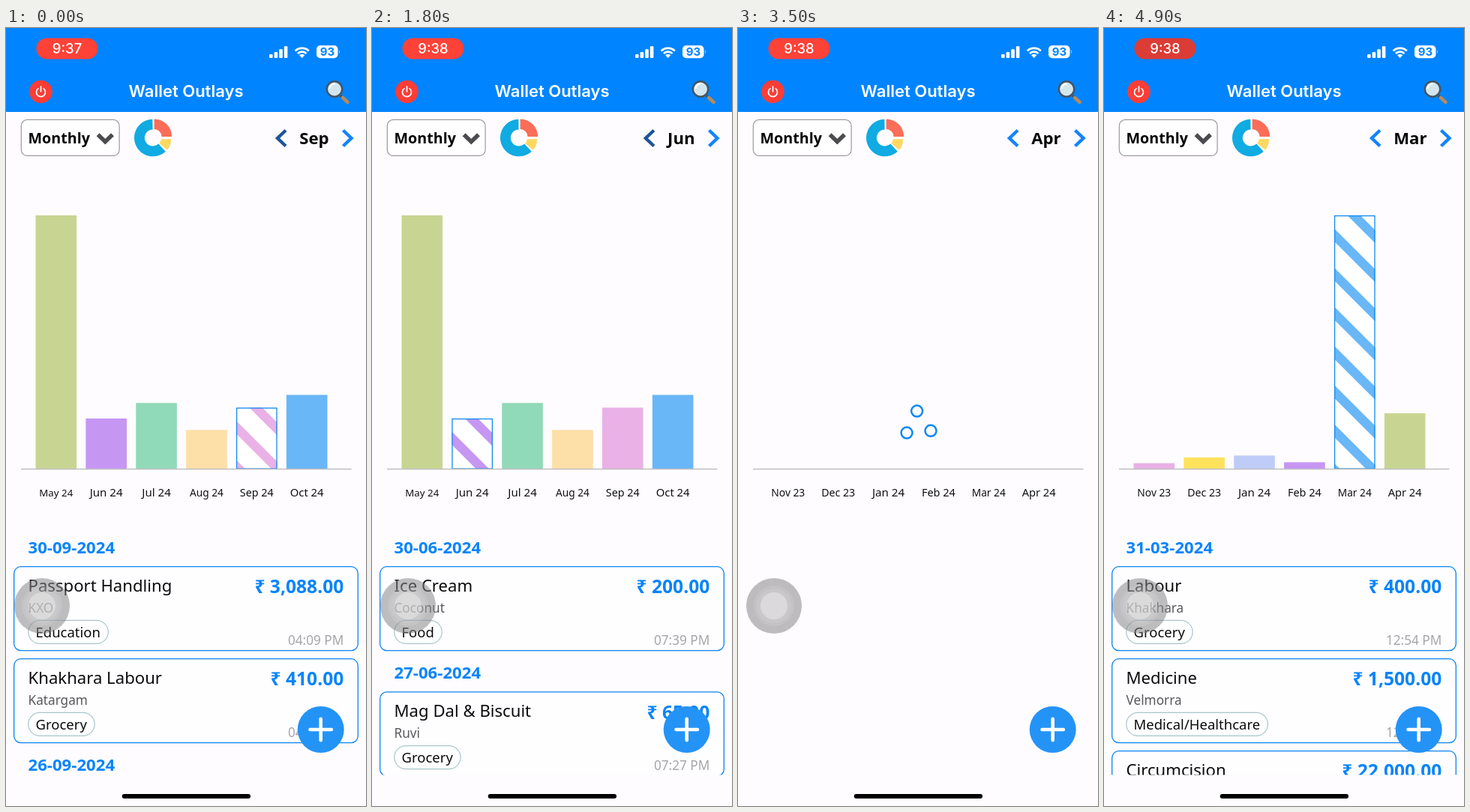
Recreate the animation shown at these times as an HTML page. Size 480x1038 px, loop 5000 ms.

```html
<!DOCTYPE html>
<html lang="en">
<head>
<meta charset="utf-8">
<title>Expense chart</title>
<style>
  html, body { margin: 0; width: 100%; height: 100%; overflow: hidden; background: #fefcff; }
  svg { display: block; }
  #stage { width: 100vw; height: 100vh; }
  text { font-family: "Noto Sans", "Open Sans", sans-serif; }
  .ui { font-family: Inter, Roboto, sans-serif; }
</style>
</head>
<body>
<svg id="stage" viewBox="0 0 480 1038">
  <rect width="480" height="1038" fill="#fefcff"/>
  <rect width="480" height="112" fill="#0084ff"/>

  <!-- status bar -->
  <rect id="pill" x="40.5" y="13.5" width="82" height="28" rx="14"/>
  <text id="clock" class="ui" x="81.5" y="34.3" font-size="18.5" font-weight="500" fill="#fff" text-anchor="middle"></text>
  <g fill="#fff">
    <rect x="351" y="35" width="4.6" height="5" rx="1.2"/>
    <rect x="357.6" y="32" width="4.6" height="8" rx="1.2"/>
    <rect x="364.2" y="28.3" width="4.6" height="11.7" rx="1.2"/>
    <rect x="370.8" y="24.2" width="4.6" height="15.8" rx="1.2"/>
    <path d="M391 36.2a5.2 5.2 0 0 1 7.4 0l-3.7 3.8z"/>
    <rect x="414" y="23.3" width="28.5" height="17" rx="5"/>
    <path d="M444 29.3q2.4 2.5 0 5z" opacity=".6"/>
  </g>
  <g fill="none" stroke="#fff" stroke-width="2.7">
    <path d="M385.6 30.6a12.9 12.9 0 0 1 18.2 0"/>
    <path d="M388.9 34.1a8.2 8.2 0 0 1 11.6 0"/>
  </g>
  <text class="ui" x="428.5" y="37.2" font-size="15" font-weight="700" fill="#0084ff" text-anchor="middle">93</text>

  <!-- title bar -->
  <circle cx="46.5" cy="85" r="15.3" fill="#fc3d36"/>
  <path d="M43 80.8a6 6 0 1 0 7 0M46.5 78v6.8" fill="none" stroke="#fff" stroke-width="1.7" stroke-linecap="round"/>
  <text class="ui" x="240" y="92.3" font-size="22" font-weight="600" fill="#fff" text-anchor="middle">Wallet Outlays</text>
  <path d="M446 90l3.5 3.5" stroke="#4a535a" stroke-width="3.5"/>
  <path d="M449 93l6.5 6" stroke="#b98a58" stroke-width="4.6" stroke-linecap="round"/>
  <circle cx="438" cy="81.5" r="10.2" fill="#d3e6ee" stroke="#46545f" stroke-width="2.4"/>
  <path d="M431.5 80a7 7 0 0 1 6-5.5" fill="none" stroke="#fff" stroke-width="2.4" stroke-linecap="round"/>

  <!-- toolbar -->
  <rect x="20.3" y="122.4" width="130.8" height="48" rx="8" fill="#fff" stroke="#9b9a9d" stroke-width="1.2"/>
  <text x="29.5" y="154" font-size="19.7" font-weight="700" fill="#050505">Monthly</text>
  <path d="M122.6 142.3l9.7 9.4 9.7-9.4" fill="none" stroke="#4c4c50" stroke-width="5.6"/>
  <g id="donut"></g>
  <path d="M449.5 136.5l11 10.5-11 10.5" fill="none" stroke="#1284fa" stroke-width="4.4"/>
  <g id="month"></g>

  <g id="chart"></g>
  <svg width="480" height="996.5"><g id="list"></g></svg>
  <g id="loader" fill="none" stroke="#0d87f8" stroke-width="2.5"></g>

  <!-- floating controls -->
  <circle cx="48" cy="771" r="37" fill="#888588" opacity=".54"/>
  <circle cx="48" cy="771" r="27" fill="#fff" opacity=".1"/>
  <circle cx="48" cy="771" r="23" fill="#fff" opacity=".08"/>
  <circle cx="48" cy="771" r="18" fill="#fff" opacity=".32"/>
  <circle cx="419.7" cy="936" r="31" fill="#2493f6"/>
  <path d="M405.5 936h28.4M419.7 921.8v28.4" stroke="#fff" stroke-width="4.6" stroke-linecap="round"/>
  <rect x="154.7" y="1022" width="171.3" height="6" rx="3" fill="#000"/>
</svg>

<script>
const LOOP = 5000, STEP = 100, BLUE = '#0684fb', FLOOR = 588;
const $ = id => document.getElementById(id);
const pen = document.createElement('canvas').getContext('2d');

const textWidth = (s, size, weight = 400) => {
  pen.font = `${weight} 100px "Noto Sans", "Open Sans", sans-serif`;
  return pen.measureText(s).width * size / 100;
};
const label = (s, x, y, size, fill, extra = '') =>
  `<text x="${x}" y="${y}" font-size="${size}" fill="${fill}" ${extra}>${s}</text>`;
const BOLD = 'font-weight="700"', RIGHT = 'text-anchor="end"', MID = 'text-anchor="middle"';

// Bars: label, top edge, colour
const LATE = [
  ['May 24', 250, '#c8d592'], ['Jun 24', 521, '#c696f3'], ['Jul 24', 500.3, '#90d9b9'],
  ['Aug 24', 536.3, '#fddfa8'], ['Sep 24', 506.5, '#e9b1e6'], ['Oct 24', 489.5, '#69b7f7']
];
const EARLY = [
  ['Nov 23', 580.6, '#e9b1e6'], ['Dec 23', 573, '#fee25c'], ['Jan 24', 570.4, '#bfccf7'],
  ['Feb 24', 579.4, '#c696f3'], ['Mar 24', 250, '#69b7f7'], ['Apr 24', 514, '#c8d592']
];

// A string is a date heading; an array is title, amount, place, tag, time
const LISTS = {
  Sep: ['30-09-2024',
    ['Passport Handling', '3,088.00', 'KXO', 'Education', '04:09 PM'],
    ['Khakhara Labour', '410.00', 'Katargam', 'Grocery', '04:08 PM'],
    '26-09-2024'],
  Jul: ['31-07-2024', ['Shev', '20.00', 'Gate Sumanti Soc', 'Grocery', '09:37 PM'],
    '30-07-2024', ['Coconut Ice Cream', '200.00', 'Mivo Ice Cream', 'Food', '09:56 PM']],
  Jun: ['30-06-2024', ['Ice Cream', '200.00', 'Coconut', 'Food', '07:39 PM'],
    '27-06-2024', ['Mag Dal &amp; Biscuit', '65.00', 'Ruvi', 'Grocery', '07:27 PM']],
  May: ['31-05-2024', ['Lunch', '50.00', 'Pelu', 'Food', '01:59 PM'],
    '30-05-2024', ['Lunch', '50.00', 'Pelu', 'Food', '01:52 PM']],
  Apr: ['29-04-2024', ['Tea &amp; Peanuts', '23.00', 'Pelu', 'Food', '03:17 PM'],
    '28-04-2024', ['Coconut water', '60.00', 'Bavi', 'Grocery', '08:53 AM']],
  Mar: ['31-03-2024',
    ['Labour', '400.00', 'Khakhara', 'Grocery', '12:54 PM'],
    ['Medicine', '1,500.00', 'Velmorra', 'Medical/Healthcare', '12:53 PM'],
    ['Circumcision', '22,000.00', 'Velmorra', 'Medical/Healthcare', '12:52 PM']]
};

// Month, time it is chosen, time its entries start to show
const VISITS = [
  ['Sep', 0, -1000], ['Aug', 100, Infinity], ['Jul', 300, 400], ['Jun', 800, 1100],
  ['May', 1900, 2000], ['Apr', 2700, 4000], ['Mar', 4400, 4800]
];

function sector(cx, cy, r, hole, from, to, fill) {
  const at = (rad, deg) => {
    const a = deg * Math.PI / 180;
    return `${cx + rad * Math.cos(a)} ${cy + rad * Math.sin(a)}`;
  };
  const big = to - from > 180 ? 1 : 0;
  return `<path fill="${fill}" d="M${at(r, from)}A${r} ${r} 0 ${big} 1 ${at(r, to)}` +
    `L${at(hole, to)}A${hole} ${hole} 0 ${big} 0 ${at(hole, from)}z"/>`;
}

function stripedBar(x, top, width, color) {
  const h = FLOOR - top, pitch = 52.22;
  let lines = '';
  for (let v = 26.1 - 2 * pitch; v < h + 20; v += pitch)
    lines += `M-20 ${v - 20}L80 ${v + 80}`;
  return `<svg x="${x}" y="${top}" width="${width}" height="${h}">
    <rect width="100%" height="100%" fill="#fff"/>
    <path d="${lines}" stroke="${color}" stroke-width="12.3"/></svg>
    <rect x="${x + .6}" y="${top + .6}" width="${width - 1.2}" height="${h - .6}" fill="none" stroke="#1389ee" stroke-width="1.3"/>`;
}

function chart(bars, month, loaded) {
  let out = '';
  bars.forEach(([name, top, color], i) => {
    const x = 39.5 + 66.87 * i, w = 54.6;
    if (loaded) out += name.startsWith(month) ? stripedBar(x, top, w, color)
      : `<rect x="${x}" y="${top}" width="${w}" height="${FLOOR - top}" fill="${color}"/>`;
    const size = Math.min(15.1, 45 / textWidth(name, 1));
    out += label(name, x + w / 2, 625.4, size, '#111', MID);
  });
  return out + `<path d="M20 588.5H460.5" stroke="#bfbec1" stroke-width="1.3"/>`;
}

function card([title, amount, place, tag, time], y) {
  return `<rect x="10.7" y="${y}" width="458.6" height="112" rx="9" fill="#fefdff" stroke="#0a84ee" stroke-width="1.3"/>
    <rect x="29.8" y="${y + 71.7}" width="${textWidth(tag, 18.5) + 20}" height="31" rx="15.5" fill="#fff" stroke="#a8c6cb" stroke-width="1.2"/>` +
    label(title, 29.5, y + 33.3, 22.15, '#0c0c0c') +
    label('₹ ' + amount, 450.3, y + 35.7, 24.6, BLUE, BOLD + RIGHT.padStart(RIGHT.length + 1)) +
    label(place, 29.5, y + 61.5, 17.2, '#58585a') +
    label(tag, 39.5, y + 93.8, 18.5, '#0c0c0c') +
    label(time, 450.3, y + 104.2, 17.2, '#a6a5a8', RIGHT);
}

function list(items) {
  let y = 692, out = '';
  items.forEach((item, i) => {
    if (typeof item === 'string') {
      if (i) y += 17.5;
      out += label(item, 29.5, y + 8.5, 22.15, BLUE, BOLD);
      y += 26.7;
    } else {
      out += card(item, y);
      y += 123;
    }
  });
  return out;
}

function monthPicker(month, pressed) {
  const x = 430.5 - textWidth(month, 22.15, 700) - 29.2;
  return label(month, 430.5, 155, 22.15, '#050505', BOLD + ' ' + RIGHT) +
    `<path d="M${x + 11} 136.5l-11 10.5 11 10.5" fill="none" stroke="${pressed ? '#1d5498' : '#1284fa'}" stroke-width="4.4"/>`;
}

function loader(t) {
  let out = '';
  for (let i = 0; i < 3; i++) {
    const a = (85 + 120 * i + (t - 3000) * .36) * Math.PI / 180;
    out += `<circle cx="${240.2 + 18.5 * Math.cos(a)}" cy="${529.5 + 18.5 * Math.sin(a)}" r="7.5"/>`;
  }
  return out;
}

function draw(t) {
  const n = VISITS.findLastIndex(v => v[1] <= t);
  const [month, , ready] = VISITS[n];
  const next = VISITS[n + 1];
  const loaded = t >= ready;
  const early = month === 'Apr' || month === 'Mar';

  const dim = Math.pow((1 + Math.cos((t - 3000) / 1900 * 2 * Math.PI)) / 2, 4);
  $('pill').setAttribute('fill', `rgb(${255 - 35 * dim},${66 - 6 * dim},${56 - 2 * dim})`);
  $('clock').textContent = t < 1300 ? '9:37' : '9:38';

  $('month').innerHTML = monthPicker(month, next && t >= next[1] - STEP);
  $('chart').innerHTML = chart(early ? EARLY : LATE, month, loaded || month !== 'Apr');
  $('list').innerHTML = loaded ? list(LISTS[month]) : '';
  $('list').setAttribute('opacity', Math.min(1, (t - ready + STEP) / (2 * STEP)) || 0);
  $('loader').innerHTML = loaded ? '' : loader(t);
}

$('donut').innerHTML =
  sector(195.8, 146.5, 24.8, 11, 47, 269, '#0fabe2') +
  sector(197.6, 145, 23.6, 10, -90, 0, '#fa6d59') +
  sector(197.6, 148.2, 22.6, 9, 0, 40, '#ffd861');

let last = -1;
const start = performance.now();
function frame() {
  const t = Math.floor((performance.now() - start) % LOOP / STEP) * STEP;
  if (t !== last) draw(last = t);
  requestAnimationFrame(frame);
}
frame();
</script>
</body>
</html>
```
